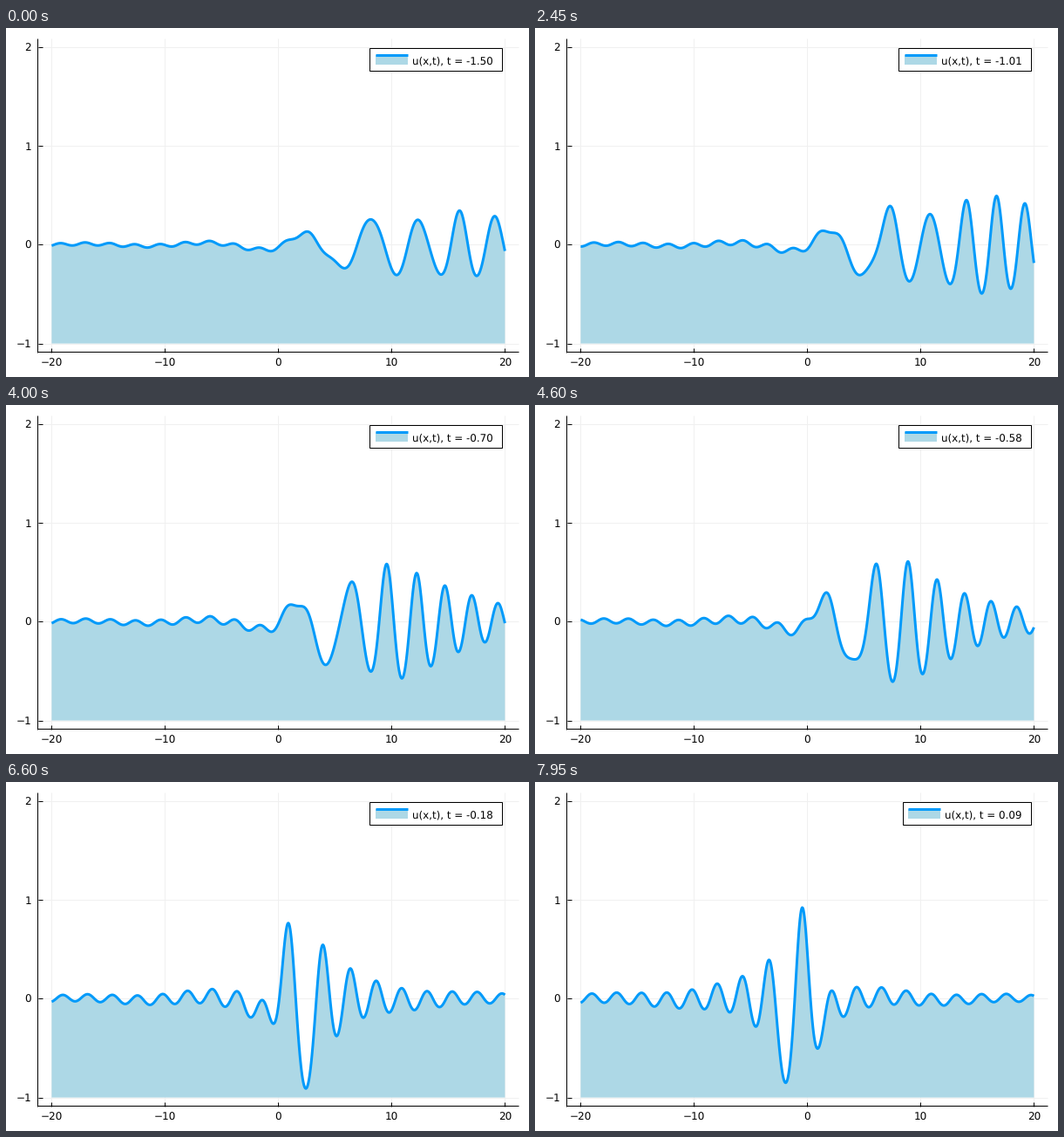
Recreate the animation shown at these times as a matplotlib script. Size 600 by 400 pixels, loop 8 s.

```python
import numpy as np
import matplotlib.pyplot as plt
from matplotlib.animation import FuncAnimation
from matplotlib.patches import Polygon, Rectangle

W, H, DPI = 600, 400, 100
FRAMES, INTERVAL = 160, 50
T0, DT = -1.5, 0.01
SUB = 8                        # integration steps per frame
N, L, FINE = 4096, 819.2, 4
K_LOW, K_HIGH = 0.6, 2.86      # band of waves with constant reflection
REFLECT = 1.0                  # scattering coefficient |b| inside the band
BLUE, FILL = "#009afa", "#add8e6"

plt.rcParams.update({"font.family": "DejaVu Sans", "text.hinting": "none",
                     "path.simplify": False})


def px(n):
    """Pixels to points."""
    return n * 72 / DPI


def sx(x):
    return 312.4 + 13.0 * x


def sy(u):
    return 248.4 - 113.2 * u


# Korteweg-de Vries: u_t + 6 u u_x + u_xxx = 0, even profile at t = 0
k = 2 * np.pi * np.fft.rfftfreq(N, L / N)
dk = k[1]
keep = k < k[-1] * 2 / 3


def scatter(sines, kk, m):
    """Coefficient b(k) of the Zakharov-Shabat system for an odd potential."""
    spec = np.zeros(m // 2 + 1, complex)
    spec[:len(sines)] = -1j * sines * m / L
    kicks = np.fft.fftshift(np.fft.irfft(spec, m)) * L / m
    turn = np.exp(-0.5j * kk * L / m)
    back = turn.conj()
    p, q = np.ones_like(turn), np.zeros_like(turn)
    for ch, sh in zip(np.cosh(kicks), np.sinh(kicks)):
        p, q = (ch * p + sh * q) * turn, (sh * p + ch * q) * back
    return q


def start_profile():
    """Find the odd v with the wanted b(k), then map it to u = v_x - v^2."""
    kk = k[k < 8]
    width = np.minimum(kk + dk / 2, K_HIGH) - np.maximum(kk - dk / 2, K_LOW)
    want = REFLECT * np.clip(width, 0, None) / dk
    sines = np.arcsinh(want)
    for _ in range(9):
        sines = sines + 0.6 * (want + scatter(sines, kk, 2 * N).imag)
    vh = np.zeros(len(k), complex)
    vh[:len(kk)] = -1j * sines * N / L
    v = np.fft.irfft(vh, N)
    return 1j * k * vh - np.fft.rfft(v * v)


def push(uh):
    u = np.fft.irfft(uh, N)
    return -3j * k * np.fft.rfft(u * u) * keep


def step(uh, h, half):
    full = half * half
    a = push(uh)
    b = push(half * (uh + h / 2 * a))
    c = push(half * uh + h / 2 * b)
    d = push(full * uh + h * half * c)
    return full * (uh + h / 6 * a) + h / 3 * half * (b + c) + h / 6 * d


def sample(uh):
    u = np.fft.irfft(uh, N * FINE) * FINE
    return u.take(np.arange(-400, 401), mode="wrap")


def solve(count):
    """Profiles at t = 0, -DT, -2 DT, ..."""
    h = -DT / SUB
    half = np.exp(1j * k ** 3 * h / 2)
    uh = start_profile()
    out = [sample(uh)]
    for _ in range(count):
        for _ in range(SUB):
            uh = step(uh, h, half)
        out.append(sample(uh))
    return out


past = solve(round(-T0 / DT))
xs = sx(np.arange(-400, 401) * 0.05)


def profile(i):
    n = i + round(T0 / DT)
    return past[-n] if n <= 0 else past[n][::-1]


fig = plt.figure(figsize=(W / DPI, H / DPI), dpi=DPI, facecolor="white")
ax = fig.add_axes([0, 0, 1, 1])
ax.set_xlim(0, W)
ax.set_ylim(H, 0)
ax.axis("off")


def line(x, y, color="black", width=1.0, **kw):
    return ax.plot(x, y, color=color, lw=px(width), solid_capstyle="butt", **kw)[0]


def label(x, y, s, size=12, **kw):
    return ax.text(x, y, s, fontsize=px(size), color="black", va="baseline", **kw)


X_TICKS, Y_TICKS = (-20, -10, 0, 10, 20), (-1, 0, 1, 2)
for v in X_TICKS:
    line([sx(v)] * 2, [12, 372], "#f0f0f0", zorder=1)
    line([sx(v)] * 2, [372, 367], zorder=5)
    label(sx(v), 387.5, str(v).replace("-", "\u2212"), ha="center")
for v in Y_TICKS:
    line([37, 588], [sy(v)] * 2, "#f0f0f0", zorder=1)
    line([37, 42], [sy(v)] * 2, zorder=5)
    label(29, sy(v) + 4.4, str(v).replace("-", "\u2212"), ha="right")
line([36, 588], [371, 371], zorder=5)
line([36, 36], [12, 372], zorder=5)

area = ax.add_patch(Polygon([[0, 0]], closed=True, fc=FILL, lw=0, zorder=2))
wave = line([], [], BLUE, 3, zorder=3, solid_joinstyle="round")

RIGHT = 569
box = ax.add_patch(Rectangle((417, 23), 152, 26, fc="white", ec="black",
                             lw=px(1), zorder=6))
swatch = ax.add_patch(Rectangle((424, 31), 37, 11, fc=FILL, lw=0, zorder=7))
key = line([], [], BLUE, 3, zorder=8)
caption = label(558.7, 41, "", size=11.9, ha="right", zorder=8)


def draw(i):
    ys = sy(profile(i))
    wave.set_data(xs, ys)
    base = sy(-1)
    area.set_xy(np.vstack([np.column_stack([xs, ys]), [xs[-1], base], [xs[0], base]]))

    n = i + round(T0 / DT)
    caption.set_text(f"u(x,t), t = {n * DT:.2f}")
    left = 417.4 if n < 0 else 421.7
    box.set_x(left)
    box.set_width(RIGHT - left)
    swatch.set_x(left + 6.4)
    key.set_data([left + 6.4, left + 43.4], [31, 31])
    return area, wave, box, swatch, key, caption


anim = FuncAnimation(fig, draw, frames=FRAMES, interval=INTERVAL, repeat=True,
                     repeat_delay=0, blit=False)
plt.show()
```
